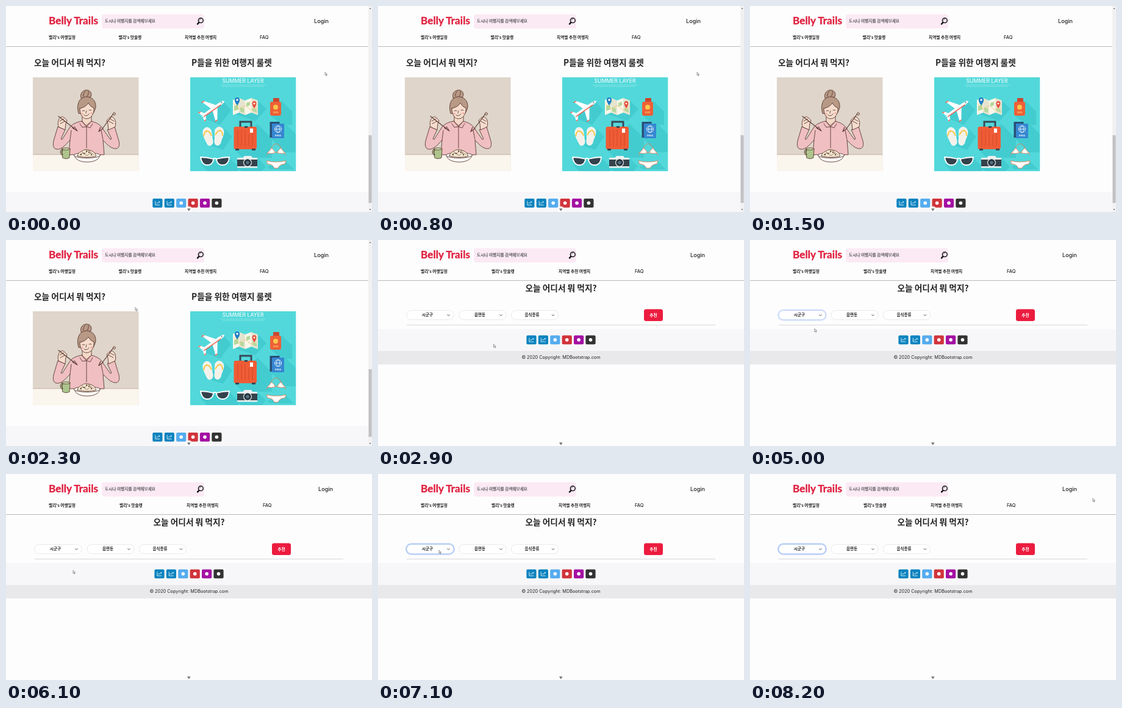
These frames come from a looping animation (600 px wide and 338 px high, 8300 ms). An HTML page:

```html
<!DOCTYPE html>
<html>
<head>
<meta charset="utf-8">
<title>Belly Trails</title>
<style>
  html, body { margin: 0; width: 100%; height: 100%; overflow: hidden; background: #fdfdfe; }
  svg { display: block; width: 100vw; height: 100vh; }
  text { font-family: "Noto Sans CJK KR", "Noto Sans", sans-serif; fill: #222; }
  .latin { font-family: Inter, sans-serif; }
  .ink { stroke: #5a3a32; stroke-width: .9; stroke-linejoin: round; stroke-linecap: round; }
  .none { fill: none; }
</style>
</head>
<body>
<svg viewBox="0 0 600 338" xmlns="http://www.w3.org/2000/svg">
  <defs>
    <clipPath id="frame"><rect x="302" y="117" width="173.5" height="154"/></clipPath>

    <g id="woman">
      <rect x="44" y="117" width="173.5" height="154" fill="#dfd5ca"/>
      <rect x="44" y="244" width="173.5" height="27" fill="#faf5ed"/>
      <path stroke="#a08a7d" stroke-width=".5" d="M44 243.800H217.5"/>
      <g class="ink">
        <path fill="#b89986" d="M123 151c-2-7 2-12 8-13 7-1 11 6 8 11z"/>
        <path fill="#b89986" d="M119 176c-4-13 0-25 11-27 11-1 18 7 17 17-1 4-2 7-4 10z"/>
        <path class="none" d="M127 148q-1-5 3-8M133 148q3-3 2-8"/>
        <path fill="#f5d9c8" d="M125 181v11l7 5 8-5v-12z"/>
        <path fill="#f6dccd" d="M121 168c6-1 11-4 14-9 2 4 5 7 9 8 1 9-4 18-12 18-7 0-11-8-11-17z"/>
        <path fill="#f0bfc2" d="M124 189c-10 2-16 5-20 11l-12 19-2-1 7-15-12-5-6 20c-3 9-2 16 4 17 7 1 14-6 22-15l-2 24h58l-2-24c8 9 15 15 22 14 5-1 6-8 3-16l-6-20-12 5 7 15-2 1-12-17c-4-7-9-10-19-13l-8 7z"/>
        <path class="none" d="M124 189l8 9 8-9M132 198v35M105 220l2-16M159 219l-3-15M121 193l4 6 7-1 6 2 4-7"/>
        <path fill="#f6dccd" d="M86 198c-2-7 0-14 5-16 4-1 6 3 9 6l-2 5-1 10z"/>
        <path fill="#f6dccd" d="M179 198c2-7 0-14-5-16-4-1-6 3-9 6l2 5 1 10z"/>
        <path class="none" d="M88 189l7-4m-6 8l8-4M177 189l-7-4m6 8l-8-4"/>
        <path class="none" d="M86 181l26 20m0-3l5 7m-8-5l8 5" stroke-width="1.200"/>
        <path class="none" d="M177 175l-6 9-13 17m-3-2l-3 7m7-5l-7 5" stroke-width="1.200"/>
        <ellipse fill="#f6dccd" cx="177.500" cy="177" rx="1.500" ry="2.500"/>
        <path class="none" d="M125 172q2-1 4 0M136 171q2-1 4 0M132 172l-1 4M128 179q5 3 8-2"/>
        <path fill="#adc58d" d="M92 235c-4 0-4 9 1 10l-.5-3c-2-1-2-4 0-4zM92 234h13l-1 15q-6 3-11 0z"/>
        <ellipse fill="#cfdfae" cx="98.500" cy="234.500" rx="6.500" ry="1.700"/>
        <path fill="#fffdf9" d="M112 245c1 7 10 11 21 11s20-4 21-11z"/>
        <ellipse fill="#fffdf9" cx="133" cy="245" rx="21.500" ry="4.500"/>
        <path fill="#f3e6cf" d="M117 246c1-5 5-7 8-8 3-3 9-3 13-1 5 1 8 4 10 9-7 3-23 3-31 0z"/>
        <path class="none" stroke-width=".6" d="M121 244q4-5 8-1t7 0 8 1M125 240q4 4 8-1t6 3"/>
      </g>
      <circle cx="125" cy="177" r="1.800" fill="#efb1a8"/><circle cx="140" cy="176" r="1.800" fill="#efb1a8"/>
      <path fill="#6d4638" d="M127 241h2v2h-2zM135 239h2v2h-2zM139 243h2v2h-2zM122 243h2v2h-2zM131 237h2v2h-2z"/>
    </g>

    <g id="summer" clip-path="url(#frame)">
      <rect x="302" y="117" width="173.5" height="154" fill="#52d8da"/>
      <path fill="#43ccd0" d="M322 183l35-26 12 14-18 24zM374 177l39-22 14 14-18 20zM435 180l17-24 17 17v22h-18zM325 226l34-24 12 12-15 22zM376 237l36-44 24 24v32h-48zM434 217l24-24 17 17v30h-18zM319 260l47-11 18 18-10 8h-40zM380 265l32-16 14 14-8 10h-30zM428 264l30-10 14 14h-38z"/>
      <path stroke="#b5eeee" stroke-width=".6" stroke-dasharray="2 .6" d="M352 129.700h74M355 132h67"/>
      <g transform="rotate(-35 339 169)">
        <path fill="#fff" d="M347 167l-13-18h-3l6 18zM347 171l-13 18h-3l6-18zM324 167l-5-7h-3l2 7zM324 171l-5 7h-3l2-7z"/>
        <path fill="#f5f7f8" d="M317 169q2-2.500 6-2.500h31q7 0 8 2.500-1 2.500-8 2.500h-31q-4 0-6-2.500z"/>
        <path stroke="#e8503b" stroke-width="1.400" d="M330 150h5M330 188h5M316 161h4M316 177h4M320 171h34"/>
        <path stroke="#48616e" d="M357 167v3"/>
      </g>
      <path fill="#f9f6e9" d="M372 154l10-3v24l-10 4z"/><path fill="#e5e4cf" d="M382 151l10 4v24l-10-4z"/>
      <path fill="#f9f6e9" d="M392 155l10-4v24l-10 4z"/><path fill="#e5e4cf" d="M402 151l11 4v24l-11-4z"/>
      <path fill="#b5d89d" d="M374 164l7-3v9l-7 2zM384 166l6 2v7l-6-2zM394 159l6-2v6l-6 2zM404 167l7 3v5l-7-3z"/>
      <path class="none" stroke="#f3c56a" stroke-width=".8" d="M373 160l9 9 10-6 10 8 10-5"/>
      <path fill="#1e7fc2" d="M379 163c-6-7-5-13 0-13s6 6 0 13z"/><circle cx="379" cy="154" r="1.700" fill="#fff"/>
      <path fill="#e74b36" d="M407 168c-5-7-4-12 0-12s5 5 0 12z"/><circle cx="407" cy="160" r="1.500" fill="#fff"/>
      <rect x="438" y="151" width="10" height="8" rx="1" fill="#c9472f"/>
      <rect x="433" y="157" width="18" height="23" rx="3" fill="#ee5f38"/>
      <circle cx="442" cy="166" r="4" fill="#fbc84c"/>
      <g fill="#f4f1ea" stroke="#fff" stroke-width=".8">
        <path d="M323 206c1-8 10-9 13-2 2 6 1 11 3 17 1 8-7 11-10 4-2-6-7-12-6-19z"/>
        <path d="M343 203c3-7 13-5 14 3 0 7-4 12-5 18-2 7-11 6-10-3 1-7 0-11 1-18z"/>
        <path class="none" stroke="#f6c544" stroke-width="1.900" d="M324 214q1-8 5-9 6 1 8 8M343 212q3-7 8-8 4 2 4 9"/>
      </g>
      <path class="none" stroke="#384a58" stroke-width="3" d="M384 199v-9h18v9"/>
      <rect x="373.500" y="198" width="37.500" height="37" rx="3" fill="#ef5c36"/>
      <path class="none" stroke="#d34727" stroke-width=".9" d="M380 203v27M386 203v27M392 203v27M398 211v19M404 203v27"/>
      <path fill="#3b4954" d="M376 234h6v3h-6zM403 234h6v3h-6zM391 197h5v3h-5z"/>
      <path fill="#fff" d="M400 201h5v7h-5z"/>
      <path fill="#284f78" d="M432.500 190h16v26h-16z"/>
      <path fill="#3687d2" d="M436 193h20v24h-20z"/>
      <g class="none" stroke="#fff" stroke-width=".8"><circle cx="446" cy="202" r="5.500"/><ellipse cx="446" cy="202" rx="2.500" ry="5.500"/><path d="M440.500 202h11"/></g>
      <g stroke="#fff" stroke-width="1.800" stroke-linejoin="round" fill="#34424e">
        <path d="M319 248q10 0 21 3-1 10-10 10t-11-13zM345 251q11-3 21-3-1 13-11 13-9 0-10-10z"/>
        <path class="none" d="M339 251q3-2 7 0"/>
      </g>
      <path fill="#eef1f1" d="M379 253v-4h9l3-3h11l2 3h8v4zM379 263h33v2.500h-33z"/>
      <rect x="379" y="252" width="33" height="11" fill="#35424b"/>
      <circle cx="396" cy="257" r="7" fill="#e5eaea"/><circle cx="396" cy="257" r="5.800" fill="#27333c"/><circle cx="396" cy="257" r="2.800" fill="#517182"/>
      <g fill="#fff" stroke="#f2764b" stroke-width=".8" stroke-linejoin="round">
        <path class="none" d="M435 234q2-7 8-8 6 1 8 8M429 242l-2 3M457 242l2 3"/>
        <path d="M428 241q4-2 7-8 5 3 6 8-6 2-13 0zM445 241q1-5 6-8 3 6 7 8-7 2-13 0zM427 254q15 4 32 0l-2 5q-9 1-11 7h-6q-2-6-11-7z"/>
        <path class="none" d="M441 240h4"/>
      </g>
    </g>
  </defs>

  <g id="home"></g>
  <g id="picker"></g>
  <path id="cursor" d="M0 0v5l1.200-1 .9 2 .9-.4-.9-2h1.600z" fill="#fff" stroke="#555" stroke-width=".6" stroke-linejoin="round"/>
</svg>
<script>
const $ = id => document.getElementById(id);
const LOOP = 8300, STEP = 100, CUT = 2900;
const QUESTION = '오늘 어디서 뭐 먹지?';
const TILES = ['#0b83bf', '#0b83bf', '#55acee', '#d1343b', '#a411a3', '#333'];
const BOLD = 'font-weight="700"', MIDDLE = 'text-anchor="middle"';

const text = (x, y, size, str, attrs = '') =>
  `<text x="${x}" y="${y}" font-size="${size}" ${attrs}>${str}</text>`;
const rect = (x, y, w, h, fill, attrs = '') =>
  `<rect x="${x}" y="${y}" width="${w}" height="${h}" fill="${fill}" ${attrs}/>`;

function header(width, navX, loginX) {
  const labels = ["벨리's 여행일정", "벨리's 맛슐랭", '지역별 추천 여행지'];
  return rect(0, 0, 600, 338, '#fdfdfe') +
    text(70, 30, 17.2, 'Belly Trails',
      BOLD + ' style="font-family:Lato,sans-serif;fill:#e0213f;stroke:#e0213f;stroke-width:.35;stroke-linejoin:round"') +
    rect(157, 13.5, 168, 23.5, '#fbeaf4', 'rx="4"') +
    text(162, 27.3, 6.7, '도시나 여행지를 검색해보세요', 'style="fill:#444;stroke:#444;stroke-width:.15"') +
    `<g fill="none" stroke="#111" stroke-linecap="round"><circle cx="319.300" cy="23.700" r="3.900" stroke-width="1.500"/>
     <path d="M316.300 27l-2.300 2.600" stroke-width="2.400"/><path d="M317.300 23q.4-1.500 2-1.700" stroke-width=".6"/></g>` +
    text(loginX, 27.5, 9.1, 'Login', 'class="latin" font-weight="500"') +
    labels.map((s, i) => text(navX[i], 53.6, 6.7, s, BOLD)).join('') +
    text(navX[3], 53.6, 7.4, 'FAQ', 'class="latin" font-weight="500"') +
    rect(0, 66, width, 1, '#b9b9bb');
}

function tiles(x, y) {
  return TILES.map((fill, i) => {
    const left = x + i * 19.4;
    const mark = i < 2
      ? `<path transform="translate(${left + 4.5} ${y + 4})" d="M0 0v6.500h7.500M1.500 4.500l1.800-2 1.300 1.200 2.400-2.700M5.300 1H7v1.700" fill="none" stroke="#fff" stroke-width=".8"/>`
      : `<circle cx="${left + 8.1}" cy="${y + 7.2}" r="2.800" fill="#fff"/>`;
    return rect(left, y, 16.2, 14.8, fill, 'rx="2"') + mark;
  }).join('');
}

const downArrow = '<path d="M297 332.200h5.600l-2.800 4.600z" fill="#777"/>';

$('home').innerHTML = header(594, [70, 184.5, 293, 416], 505) +
  text(46, 98.4, 13.7, QUESTION, BOLD) +
  text(304, 98.4, 13.7, 'P들을 위한 여행지 룰렛', BOLD) +
  '<use href="#woman"/><use href="#summer"/>' +
  text(388.5, 126.3, 8.7, 'SUMMER LAYER', MIDDLE + ' class="latin" style="fill:#fff"') +
  text(442, 175.5, 4, 'SUN', MIDDLE + BOLD + ' style="fill:#fbd667"') +
  text(446, 213.8, 4, 'PASS', MIDDLE + BOLD + ' style="fill:#fff"') +
  rect(0, 305, 594, 33, '#f7f7f9') + tiles(240.3, 316) +
  '<circle cx="299.800" cy="334" r="5.500" fill="#fff" opacity=".85"/>' + downArrow +
  rect(594, 0, 6, 338, '#f1f1f2') + rect(594.5, 212, 5, 111, '#c1c1c3') +
  '<path d="M595.500 5l1.500-2 1.500 2zM595.500 333l1.500 2 1.500-2z" fill="#666"/>';

const pill = (x, label, id) =>
  rect(x, 115.5, 77, 15.3, '#fff', `rx="7.650" stroke="#e3e4e8" stroke-width=".8" id="${id}"`) +
  text(x + 34, 125.4, 6.5, label, MIDDLE + BOLD) +
  `<path d="M${x + 66.5} 122.300l2 2 2-2" fill="none" stroke="#333" stroke-width=".9"/>`;

$('picker').innerHTML = header(600, [70, 186, 296, 421], 512) +
  text(300, 83.8, 13.7, QUESTION, BOLD + MIDDLE) +
  rect(46, 114.5, 79, 17.3, 'none', 'id="ring" rx="8.650" stroke="#b9d0fa" stroke-width="2"') +
  pill(47, '시군구', 'city') + pill(133, '읍면동', 'town') + pill(218.5, '음식종류', 'food') +
  rect(436, 113.5, 31, 19.5, '#ec1c3f', 'rx="3.500"') +
  text(451.5, 125.6, 6.8, '추천', BOLD + MIDDLE + ' style="fill:#fff"') +
  rect(47, 139, 506, .8, '#cfcfd1') +
  rect(0, 146, 600, 36, '#f7f7f9') + tiles(243.4, 156.5) +
  rect(0, 182, 600, 22.3, '#e9e9eb') +
  text(300, 195.3, 7.3, '© 2020 Copyright: MDBootstrap.com', MIDDLE + ' class="latin"') +
  downArrow;

// time, x, y of the pointer tip
const PATH = [
  [0, 523, 108.5], [800, 523, 108.5], [1400, 470, 112], [1900, 258, 105], [2300, 212, 110.5],
  [2700, 189.5, 171], [3100, 189.5, 171], [3900, 99.5, 126], [4600, 99.5, 126], [5300, 110, 158],
  [6300, 110, 158], [6700, 100, 125], [7300, 100, 125], [7800, 594, 3], [8100, 562, 40], [LOOP, 562, 40]
];
// time, strength of the focus ring
const FOCUS = [[0, 0], [3900, 0], [4000, .2], [4200, 1], [4900, 1], [5100, 0], [6600, 0], [6800, 1], [LOOP, 1]];

function sample(table, t) {
  const i = Math.max(1, table.findIndex(row => row[0] >= t));
  const a = table[i - 1], b = table[i];
  const p = (t - a[0]) / (b[0] - a[0]);
  const k = p * p * (3 - 2 * p);
  return a.slice(1).map((v, n) => v + (b[n + 1] - v) * k);
}

function draw(now) {
  const t = Math.floor(now % LOOP / STEP) * STEP;
  const [x, y] = sample(PATH, t), [focus] = sample(FOCUS, t);
  const home = t < CUT;
  $('home').style.display = home ? '' : 'none';
  $('picker').style.display = home ? 'none' : '';
  $('cursor').setAttribute('transform', `translate(${x} ${y})`);
  $('cursor').style.display = t >= 1400 && t < 1900 ? 'none' : '';
  $('ring').setAttribute('opacity', focus);
  $('city').setAttribute('stroke', focus > 0 ? '#a9c3ee' : '#e3e4e8');
}

const start = performance.now();
function tick() {
  draw(performance.now() - start);
  requestAnimationFrame(tick);
}
tick();
</script>
</body>
</html>
```
